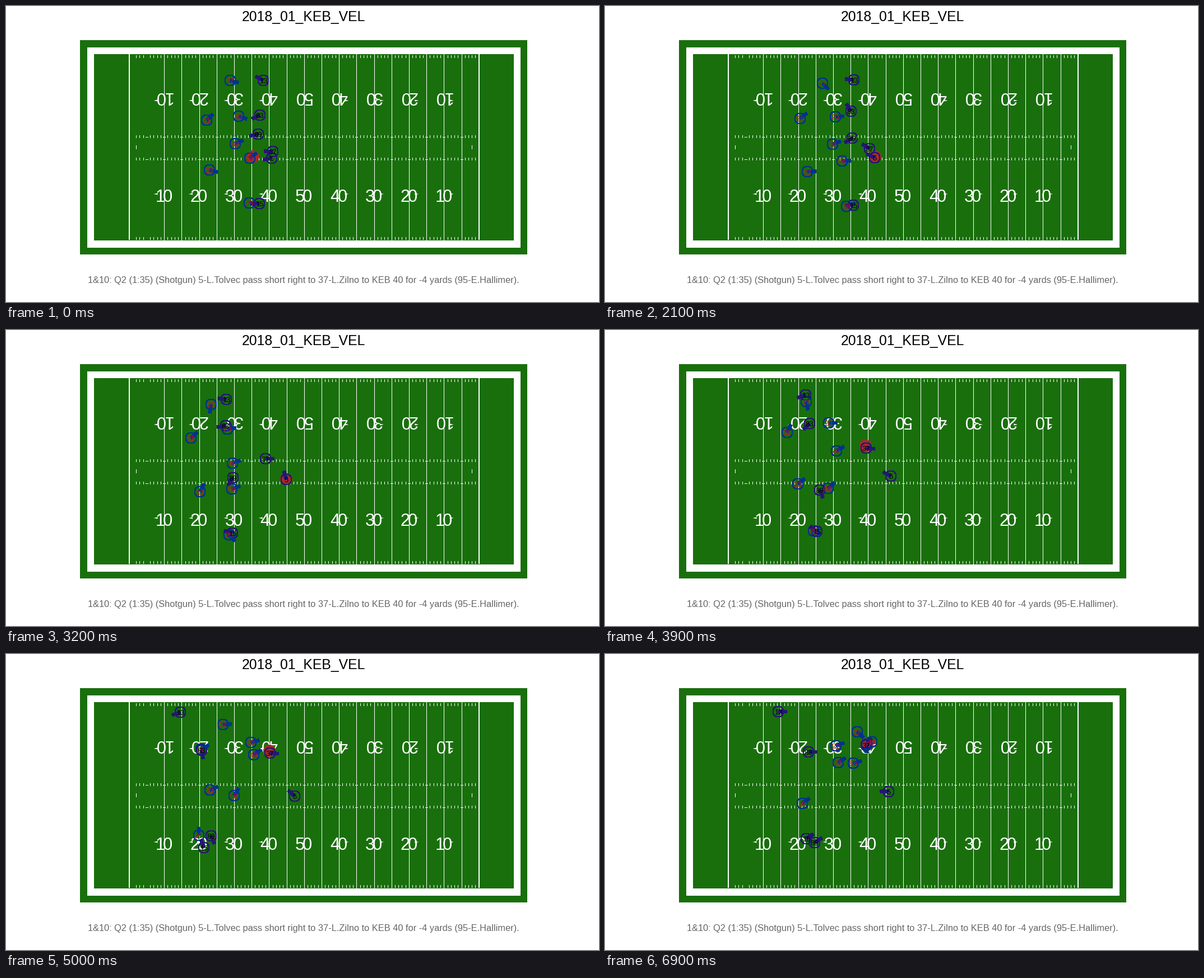
A matplotlib script that plays this animation: 1058 by 529 pixels, repeating every 7000 ms.

```python
import numpy as np
import matplotlib.pyplot as plt
from matplotlib.animation import FuncAnimation
from matplotlib.patches import Circle, Polygon, Rectangle

W, H, DPI = 1058, 529, 64
PX = 72 / DPI                      # points per pixel
FRAMES, INTERVAL = 70, 100
YARD, MID_X, MID_Y = 6.24, 531.2, 252.2
GREEN, BALL = "#196f0c", "#a52a2a"
DEFENCE = ("#00338d", "#c60c30")   # shape colour, number colour
OFFENCE = ("#241773", "black")
KEYS = [0, 21, 32, 39, 50, 59, 69]
SNAP = 11

plt.rcParams["font.family"] = "Liberation Sans"
fig = plt.figure(figsize=(W / DPI, H / DPI), dpi=DPI, facecolor="white")
ax = fig.add_axes([0, 0, 1, 1])
ax.set(xlim=(0, W), ylim=(H, 0))
ax.axis("off")


def text(x, y, label, size, color, **kw):
    return ax.text(x, y, label, fontsize=size * PX, color=color,
                   ha="center", va="baseline", **kw)


def yard_x(yard):
    return np.floor(MID_X + (np.asarray(yard) - 50) * YARD) + 0.5


def white_lines(draw, *args, width=1):
    draw(*args, colors="white", linewidths=width * PX, antialiased=False, zorder=2)


def rect(x0, y0, x1, y1, color):
    ax.add_patch(Rectangle((x0, y0), x1 - x0, y1 - y0, color=color, lw=0, zorder=1))


def draw_field():
    rect(132, 61, 930, 443.5, GREEN)
    rect(145, 74, 918, 431.5, "white")
    rect(157, 86, 905.5, 418.5, GREEN)

    white_lines(ax.vlines, yard_x(range(10, 100, 5)), 86, 418)
    white_lines(ax.vlines, yard_x([0, 100]) + 0.5, 86, 418, width=2)
    ticks = yard_x([y for y in range(2, 100) if y % 5])
    for top, bottom in ((88, 92), (231, 235), (271, 275), (413, 417)):
        white_lines(ax.vlines, ticks, top, bottom)
    white_lines(ax.vlines, yard_x([2, 98]), 249, 255)
    fives = yard_x(range(5, 100, 5))
    for y in (233.5, 273.5):
        white_lines(ax.hlines, np.full(len(fives), y), fives - 2, fives + 2)

    for yard in range(10, 100, 10):
        x = MID_X + (yard - 50) * YARD
        tens = str(min(yard, 100 - yard) // 10)
        for digit, dx in ((tens, -6.6), ("0", 6.6)):
            text(x + dx, 350, digit, 31, "white", zorder=3)
            text(x - dx, 2 * MID_Y - 350, digit, 31, "white", zorder=3,
                 rotation=180, rotation_mode="anchor")
        if yard != 50:
            side = np.sign(yard - 50)
            for y in (169, 336):
                ax.add_patch(Polygon([(x + side * 18, y), (x + side * 11, y - 1.5),
                                      (x + side * 11, y + 1.5)],
                                     color="white", lw=0, zorder=3))


def smooth(times, values):
    """Monotone cubic through the keys, sampled at every frame."""
    t, v = np.array(times, float), np.array(values, float)
    h = np.diff(t)
    d = np.diff(v) / h
    m = np.r_[d[0], np.zeros(len(d) - 1), d[-1]]
    for i in range(1, len(d)):
        if d[i - 1] * d[i] > 0:
            w1, w2 = 2 * h[i] + h[i - 1], h[i] + 2 * h[i - 1]
            m[i] = (w1 + w2) / (w1 / d[i - 1] + w2 / d[i])
    f = np.arange(FRAMES)
    k = np.clip(np.searchsorted(t, f, side="right") - 1, 0, len(d) - 1)
    s = (f - t[k]) / h[k]
    return ((1 + 2 * s) * (1 - s) ** 2 * v[k] + s * (1 - s) ** 2 * h[k] * m[k]
            + s * s * (3 - 2 * s) * v[k + 1] + s * s * (s - 1) * h[k] * m[k + 1])


def path(values, times=None):
    if times is None:              # hold nearly still until the snap
        hold = values[0] + 0.1 * (values[1] - values[0])
        values = [values[0], hold, *values[1:]]
        times = [0, SNAP, *KEYS[1:]]
    return smooth(times, values)


class Player:
    def __init__(self, team, number, xs, ys, facing, times=None):
        shape, ink = team
        self.x, self.y = path(xs, times), path(ys, times)
        self.angle = np.radians(path(facing, times))
        self.ring = ax.add_patch(Circle((0, 0), 9.5, fill=False, ec=shape, lw=PX,
                                        antialiased=False, zorder=5))
        self.bar, = ax.plot([], [], color=shape, lw=5.5 * PX, antialiased=False,
                            solid_capstyle="butt", zorder=6)
        self.label = text(0, 0, str(number), 13, ink, zorder=7)

    def place(self, i):
        x, y, a = self.x[i], self.y[i], self.angle[i]
        self.ring.center = x, y
        self.bar.set_data([x, x + 15.5 * np.cos(a)], [y, y + 15.5 * np.sin(a)])
        self.label.set_position((x, y + 5))


draw_field()
text(530.7, 26.5, "2018_01_KEB_VEL", 24.7, "black")
text(531, 494.5, "1&10: Q2 (1:35) (Shotgun) 5-L.Tolvec pass short right to "
     "37-L.Zilno to KEB 40 for -4 yards (95-E.Hallimer).", 16.35, "#666666")

# Facing is in degrees, clockwise from the right.
players = [
    Player(DEFENCE, 27, [400, 388, 366, 359, 387, 420, 450],
           [133, 138, 133, 128, 126, 132, 139], [15, 45, 100, 78, -3, 19, 43]),
    Player(DEFENCE, 21, [358, 348, 330, 325, 348, 381, 412],
           [204, 201, 193, 183, 170, 170, 164], [-43, -38, -42, -65, -28, -27, -20]),
    Player(DEFENCE, 20, [415, 411, 395, 399, 437, 462, 467],
           [197, 198, 177, 166, 158, 157, 161], [18, -4, -8, 0, -15, 40, 92]),
    Player(DEFENCE, 49, [409, 406, 404, 413, 442, 466, 476],
           [246, 247, 238, 216, 180, 158, 157], [-24, -20, -20, -30, -35, 45, 125]),
    Player(DEFENCE, 58, [435, 423, 403, 398, 407, 427, 443],
           [272, 277, 284, 283, 253, 222, 195], [-38, -2, -20, -42, -58, -50, -15]),
    Player(DEFENCE, 23, [363, 361, 346, 344, 364, 388, 416],
           [293, 296, 289, 275, 243, 217, 194], [15, -2, -62, -38, -23, -33, -33]),
    Player(DEFENCE, 28, [434, 431, 398, 372, 344, 341, 352],
           [352, 358, 366, 359, 324, 292, 267], [0, -18, 48, 28, -90, -70, -36]),
    Player(OFFENCE, 13, [459, 457, 444, 393, 358, 311, 297, 297, 301, 309],
           [133, 133, 132, 124, 116, 104, 101, 101, 102, 103],
           [208, 206, 186, 187, 160, 160, 250, 328, 330, 360],
           [0, SNAP, 21, 32, 39, 50, 56, 59, 64, 69]),
    Player(OFFENCE, 83, [453, 439, 392, 365, 349, 352, 363],
           [195, 188, 171, 167, 172, 173, 175], [155, 238, 170, 135, 80, 8, 0]),
    Player(OFFENCE, 89, [450, 441, 405, 383, 366, 365, 374],
           [229, 236, 264, 286, 325, 341, 337], [168, 148, 124, 68, 68, 0, -32]),
    Player(OFFENCE, 37, [476, 472, 463, 466, 471, 470, 466],
           [260, 255, 230, 211, 177, 160, 163], [182, 212, 360, 365, 364, 240, 310]),
    Player(OFFENCE, 5, [474, 474, 476, 481, 490, 500, 510, 515, 512, 510, 506],
           [272, 272, 272, 271, 270, 267, 261, 254, 250, 248, 246],
           [170, 172, 188, 205, 225, 255, 207, 222, 220, 205, 183],
           [0, 8, 16, 21, 24, 32, 39, 50, 59, 64, 69]),
    Player(OFFENCE, 15, [452, 443, 404, 378, 353, 351, 359],
           [353, 356, 363, 360, 346, 337, 330], [178, 180, 195, 215, 250, 308, 327]),
]

ball_times = [0, 10, 17, 21, 24, 33, 38, 39, 50, 59, 69]
ball_x = path([441, 441, 475, 482, 490, 500, 467, 465, 470, 471, 467], ball_times)
ball_y = path([269, 269, 270, 269, 269, 266, 212, 207, 173, 161, 161], ball_times)
ball = ax.add_patch(Circle((0, 0), 10.3, color=BALL, lw=0, antialiased=False, zorder=4))


def update(i):
    ball.center = ball_x[i], ball_y[i]
    for player in players:
        player.place(i)


anim = FuncAnimation(fig, update, frames=FRAMES, interval=INTERVAL,
                     repeat=True, repeat_delay=0)
plt.show()
```
